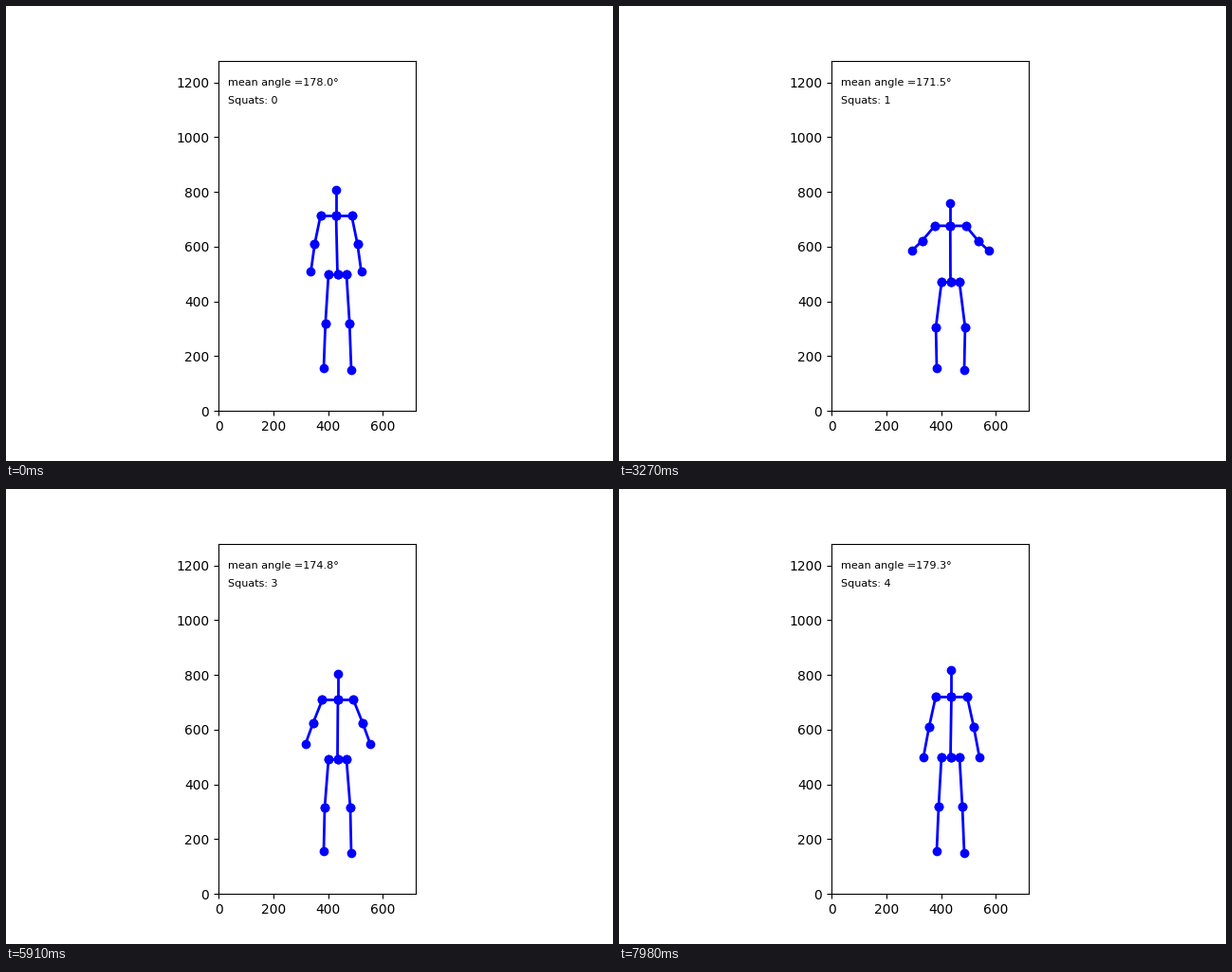
These frames come from a looping animation (640 by 480 pixels, 8000 ms). A matplotlib script:

```python
import numpy as np
import matplotlib.pyplot as plt
from matplotlib.animation import FuncAnimation

FRAMES, INTERVAL, STEP = 250, 32, 30
LOOP = FRAMES * INTERVAL
SCALE = 0.28875                     # stage pixels per data unit
ORIGIN = np.array([224.05, 427.2])  # data origin on the stage
MID = 349.5                         # middle of the legs on the stage

# One squat: knee angle against the time from its lowest moment
BOTTOMS = [2160, 3790, 5280, 6940]
DIP_TIME = [-700, -510, -220, -110, 0, 150, 200, 380, 630, 850]
DIP_ANGLE = [180, 171, 152, 130, 121, 129.2, 145.1, 166.8, 174.8, 180]

# How far the body has sunk for a knee angle
SINK_ANGLE = [120, 129.2, 145.1, 166.8, 174.8, 179]
SINK = [1.04, 1, 0.94, 0.335, 0.045, 0]

SPINE = [("head", "neck"), ("neck", "pelvis")]
SIDE = [("neck", "shoulder"), ("shoulder", "elbow"), ("elbow", "wrist"),
        ("pelvis", "hip"), ("hip", "knee"), ("knee", "ankle")]


def mix(a, b, k):
    return np.array(a) * (1 - k) + np.array(b) * k


def knee_angle(t):
    standing = 179.3 - 1.3 * np.exp(-t / 1040)
    dips = [np.interp(t - b, DIP_TIME, DIP_ANGLE) for b in BOTTOMS]
    return min(standing, *dips)


def body(t, angle):
    """Bones as pairs of points in stage pixels."""
    c = np.interp(angle, SINK_ANGLE, SINK)
    p = t / LOOP
    bend = 1 - np.exp(-4 * c)        # knees move early in the squat
    arms = 1 - np.exp(-11 * c)       # arms swing out even earlier
    sag = min(c, 1) ** 30            # and drop a little at the bottom
    tilt = c * c
    chest = 348 + 2.5 * p + 1.5 * c  # slow drift to the right

    shoulder = np.array([16.5 - 1.5 * c, 220.7 - 2 * p + 72.5 * c])
    elbow = shoulder + mix([5 + 2 * p, 32], [15, 13 + 4 * sag], arms)
    wrist = shoulder + mix([8 + 5 * p, 64], [27, 19 + 13 * sag], arms)
    # Offset from the axis, height, axis, and tilt towards the right
    joints = {
        "shoulder": (*shoulder, chest, 2 * tilt),
        "elbow": (*elbow, chest, 3 * tilt),
        "wrist": (*wrist, chest, 4 * tilt),
        "hip": (9.5 - c, 282.5 + 48.5 * c, MID, 0),
        "knee": (12.5 + 6 * bend, 335 + 8 * bend, MID, 1.5 * tilt),
        "ankle": (14.5, 382.6, MID, 1.1),
    }
    centre = {
        "head": (chest, 193.5 - 3 * p + 93 * c),
        "neck": (chest, shoulder[1]),
        "pelvis": (MID, joints["hip"][1]),
    }
    bones = [(centre[a], centre[b]) for a, b in SPINE]
    for s in (-1, 1):
        points = dict(centre)
        for name, (dx, y, axis, lean) in joints.items():
            points[name] = (axis + s * dx, y + s * lean)
        bones += [(points[a], points[b]) for a, b in SIDE]
    return np.array(bones)


times = np.arange(0, LOOP, STEP)
angles = np.array([knee_angle(t) for t in times])
risen = (angles[1:] >= 140) & (angles[:-1] < 140)
squats = np.concatenate([[0], np.cumsum(risen)])

fig, ax = plt.subplots(figsize=(6.4, 4.8), dpi=100)
ax.set_aspect("equal")
ax.set_xlim(0, 720)
ax.set_ylim(0, 1280)
lines = [ax.plot([], [], "bo-", lw=2)[0]
         for _ in range(len(SPINE) + 2 * len(SIDE))]
angle_text = ax.text(0.05, 0.9286, "", fontsize=8, transform=ax.transAxes)
count_text = ax.text(0.05, 0.8772, "", fontsize=8, transform=ax.transAxes)


def update(frame):
    n = min(round((frame * INTERVAL + 15) / STEP), len(times) - 1)
    bones = (body(times[n], angles[n]) - ORIGIN) / SCALE * [1, -1]
    for line, bone in zip(lines, bones):
        line.set_data(bone[:, 0], bone[:, 1])
    angle_text.set_text(f"mean angle ={angles[n]:.1f}°")
    count_text.set_text(f"Squats: {squats[n]}")
    return [*lines, angle_text, count_text]


anim = FuncAnimation(fig, update, frames=FRAMES, interval=INTERVAL,
                     repeat=True, repeat_delay=0)
plt.show()
```
